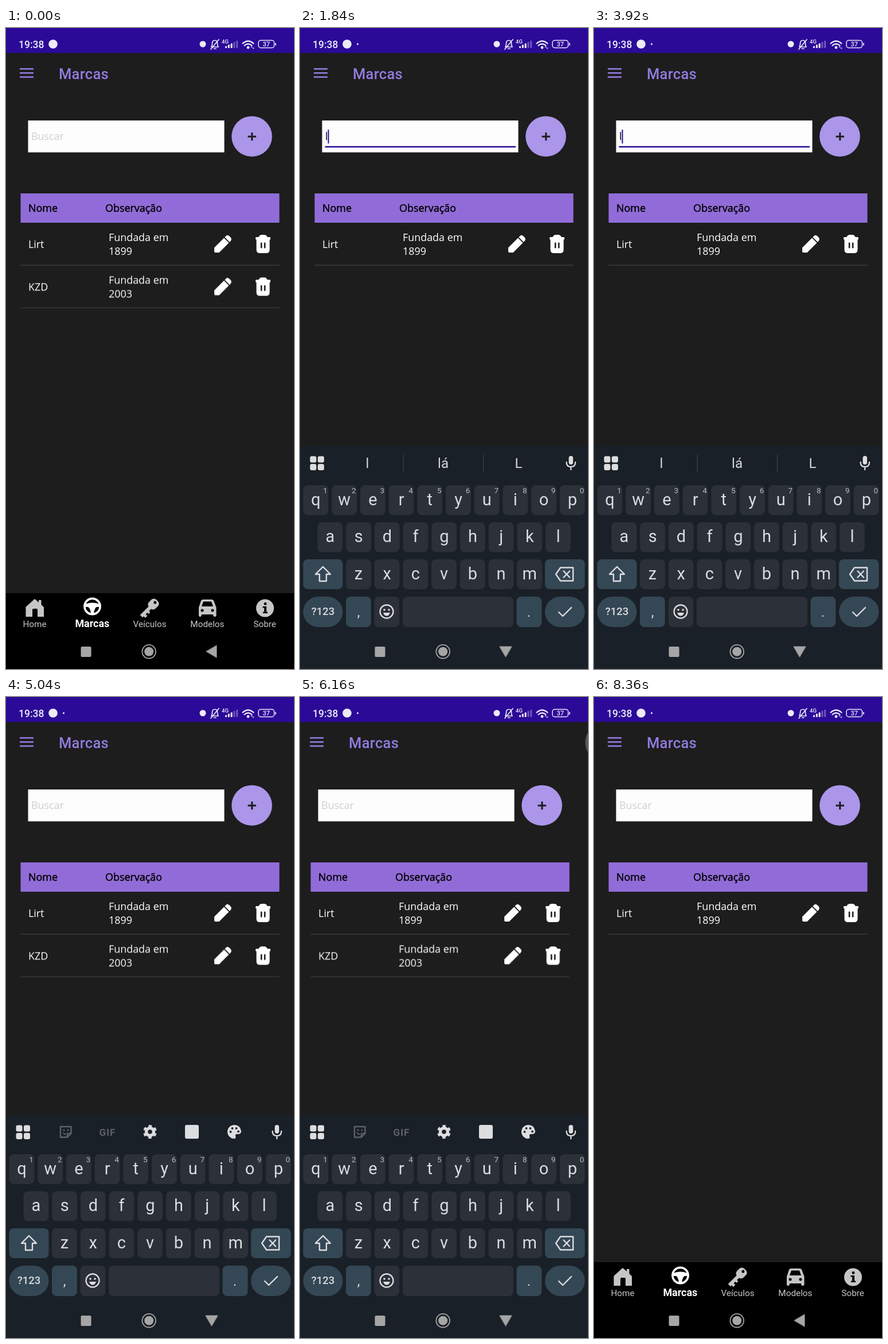
An HTML page for the animation above (8520 ms loop, 502 by 1116 pixels).

```html
<!DOCTYPE html>
<html lang="pt">
<head>
<meta charset="utf-8">
<title>Marcas</title>
<style>
html, body { margin: 0; width: 100%; height: 100%; overflow: hidden; background: #1d1d1d; }
svg { display: block; width: 502px; height: 1116px; }
text { font-family: Roboto, sans-serif; white-space: pre; }
.os { font-family: "Open Sans", sans-serif; font-size: 17.9px; }
.mid { text-anchor: middle; }
.key { font-size: 29px; fill: #d9dce0; text-anchor: middle; }
.line { fill: none; stroke-linecap: round; stroke-linejoin: round; }
#dialog { transform-origin: 251px 550px; }
</style>
</head>
<body>
<svg id="stage" viewBox="0 0 502 1116"></svg>
<script>
const LOOP = 8520;
const BG = '#1d1d1d', LILAC = '#917bdf', INDIGO = '#2b0a98', KEYS = '#1a2027';
const LIGHT = '#dddde0', GREY = '#c6c6c6', DIM = '#5c6167';

const rect = (x, y, w, h, fill, r = 0, more = '') =>
  `<rect x="${x}" y="${y}" width="${w}" height="${h}" rx="${r}" fill="${fill}" ${more}/>`;
const circle = (x, y, r, fill, more = '') => `<circle cx="${x}" cy="${y}" r="${r}" fill="${fill}" ${more}/>`;
const text = (x, y, s, more = '') => `<text x="${x}" y="${y}" ${more}>${s}</text>`;
const path = (d, fill, more = '') => `<path d="${d}" fill="${fill}" ${more}/>`;
const line = (d, color, w, more = '') => `<path class="line" d="${d}" stroke="${color}" stroke-width="${w}" ${more}/>`;
const group = (id, body, more = '') => `<g id="${id}" ${more}>${body}</g>`;

/* app pages */
const pencil = path('M363 382.5L380 365.5 388.5 374 371.5 391H365Q363 391 363 389Z' +
  'M381.300 364.2L383.5 362Q386.500 359.500 389.5 362.500L391.5 364.5Q394 367.5 391.8 370.6L389.800 372.7Z', '#fff');
const trash = path('M435 365.5Q435 364 436.5 364H440.5Q442 360 446 360H450Q454 360 455.5 364H459.5Q461 364 461 365.5V367Q461 368.5 459.5 368.5V386Q459.5 392 453.5 392H442.5Q436.5 392 436.5 386V368.5Q435 368.5 435 367Z', '#fff') +
  rect(443.8, 373.5, 2.6, 10, BG, 1) + rect(449.8, 373.5, 2.6, 10, BG, 1);

function row(i, name, year) {
  const t = (x, y, s) => text(x, y, s, 'class="os" fill="#fff"');
  return group('row' + i,
    (i ? rect(432, 361, 32, 32, '#353535', 2, 'id="press"') : '') +
    t(39, 382.5, name) + t(179, 370.5, 'Fundada em') + t(179, 394.5, year) +
    pencil + trash + rect(25.5, 412.5, 451, 1, '#4b4b4b'),
    `transform="translate(0 ${i * 74.3})"`);
}

function page(x, title, body, focus = '') {
  const head = 'class="os" fill="#000" stroke="#000" stroke-width=".45"';
  return `<g transform="translate(${x})">` + focus +
    [71.2, 78.3, 85.4].map(y => rect(24, y - 1.3, 24, 2.6, LILAC)).join('') +
    text(92, 89, title, `font-size="25.5" font-weight="500" letter-spacing=".3" fill="${LILAC}"`) +
    rect(38.5, 161, 342, 55.5, '#fdfdfd') +
    circle(428.5, 188.7, 35.3, '#ab96ea') +
    line('M421.5 189H436M428.8 182V196', BG, 3, 'style="stroke-linecap:butt"') +
    rect(25.5, 288, 451, 51, '#916cd8') +
    text(39, 320, 'Nome', head) + text(173, 320, 'Observação', head) + body + '</g>';
}
const hint = id => text(44, 195, 'Buscar', `${id} class="os" fill="#cfcfcf"`);

const typed = ['', 'l', 'li', 'lir'];
const field = hint('id="word0"') +
  typed.slice(1).map((s, i) => text(44, 195, s, `id="word${i + 1}" class="os" fill="#000"`)).join('') +
  rect(43.5, 205.6, 332.500, 2.5, INDIGO, 0, 'id="underline"') + rect(44, 177, 2, 24, INDIGO, 0, 'id="cursor"');

const pages = group('pages',
  page(0, 'Marcas', field + row(0, 'Lirt', '1899') + row(1, 'KZD', '2003')) +
  page(502, 'Veículos', hint(''), circle(36, 79, 34, '#585858')));

/* bottom tabs */
const tabIcons =
  path('M34.5 1008L50 994 57 1000V996H61.5V1004L66 1008.5V1025H55V1013Q55 1011 53 1011H48Q46 1011 46 1013V1025H34.5Z', GREY) +
  circle(150.5, 1007, 13.6, 'none', 'stroke="#fff" stroke-width="3.6"') +
  path('M138 1003Q150.5 998 163 1003V1008H158Q154 1010 153 1020H148Q147 1010 143 1008H138Z', '#fff') +
  `<g transform="rotate(45 257 1003)">${rect(249, 994, 16, 18, GREY, 6)}${rect(254, 1008, 6, 25, GREY)}` +
  `${rect(259, 1017, 4, 4, GREY)}${rect(259, 1025, 5, 5, GREY)}${circle(257, 999, 2.5, '#000')}</g>` +
  path('M336 1009L340 997Q341 995 344 995H358Q361 995 362 997L366.5 1009V1023Q366.5 1025 364 1025 361 1025 361 1021H341Q341 1025 338 1025 336 1025 336 1023Z', GREY) +
  path('M341 1007L344 998.5H358L361 1007Z', '#000') + circle(342, 1014, 2.5, '#000') + circle(360, 1014, 2.5, '#000') +
  circle(451.5, 1010, 15.5, GREY) + circle(452, 1002.5, 2.4, '#000') + path('M447.5 1007H454V1016.5H456V1019H448V1016.5H450V1009.5H447.5Z', '#000');
const tabs = rect(0, 984, 502, 132, '#000') + tabIcons +
  ['Home', 'Marcas', 'Veículos', 'Modelos', 'Sobre'].map((s, i) => text(50 + i * 100.3, 1042.5, s,
    'class="mid" ' + (i === 1 ? 'font-size="17.9" font-weight="700" fill="#fff"' : `font-size="15.3" fill="${GREY}"`))).join('');

/* keyboard */
const PITCH = 49.7, PLAIN = '#2c3038', SPECIAL = '#344754';
const rows = [['qwertyuiop', 5.5, 796], ['asdfghjkl', 30.5, 860.5], ['zxcvbnm', 80, 925]];
const keyAt = c => {
  const [s, x, y] = rows.find(r => r[0].includes(c));
  return [x + s.indexOf(c) * PITCH, y];
};
const letters = rows.map(([s, , y], n) => [...s].map((c, i) => {
  const [x] = keyAt(c);
  return rect(x, y, 43.8, 52, PLAIN, 8) + text(x + 22, y + 34.5, c, 'class="key"') +
    (n ? '' : text(x + 38.5, y + 14, (i + 1) % 10, 'class="mid" font-size="13.5" fill="#b9bdc2"'));
}).join('')).join('');

const specials =
  rect(5.5, 925, 69, 52, SPECIAL, 8) + line('M40 938L53 951H46V963H34V951H27Z', LIGHT, 2.4) +
  rect(427, 925, 69.5, 52, SPECIAL, 8) +
  line('M446 951L454 939.5H476V962.5H454ZM459.5 945.5L470 956.5M470 945.5L459.5 956.5', LIGHT, 2.4) +
  rect(5.5, 990, 69, 53, SPECIAL, 26.5) + text(40, 1022, '?123', 'class="mid" font-size="18.5" font-weight="500" fill="#d9dce0"') +
  rect(80, 990, 43.8, 53, SPECIAL, 8) + text(102, 1025, ',', 'class="key" style="font-size:24px"') +
  rect(129.5, 990, 43.8, 53, PLAIN, 8) + circle(151, 1016, 11.5, 'none', `stroke="${LIGHT}" stroke-width="2.3"`) +
  circle(147, 1013, 1.8, LIGHT) + circle(155, 1013, 1.8, LIGHT) + path('M145 1018H157Q155 1023.5 151 1023.5 147 1023.5 145 1018Z', LIGHT) +
  rect(179, 990, 193, 53, PLAIN, 8) +
  rect(377.5, 990, 43.8, 53, SPECIAL, 8) + text(399, 1025, '.', 'class="key" style="font-size:24px"') +
  rect(427, 990, 69.5, 53, SPECIAL, 26.5) + line('M451 1017L458 1024 473 1009', LIGHT, 2.4);

const grid = [17.5, 31].map(x => [745.5, 759].map(y => rect(x, y, 11, 11, LIGHT, 3)).join('')).join('');
const mic = rect(468.5, 745, 7.5, 15, LIGHT, 3.7) + line('M464.5 756Q464.5 764 472.2 764 480 764 480 756M472.2 764V769', LIGHT, 2.3);
const tools = group('tools',
  line('M95 748H113.5V760L107 766.5H95ZM107 766V760H113', DIM, 2.4) +
  circle(101, 754, 1.6, DIM) + circle(108, 754, 1.6, DIM) + line('M100 759Q102 762 104 761', DIM, 1.8) +
  text(177, 763.5, 'GIF', `class="mid" font-size="17" font-weight="700" letter-spacing="1" fill="${DIM}"`) +
  circle(251, 757, 6.5, 'none', `stroke="${LIGHT}" stroke-width="5.5"`) +
  circle(251, 757, 10, 'none', `stroke="${LIGHT}" stroke-width="4" stroke-dasharray="5.236" transform="rotate(15 251 757)"`) +
  rect(312, 745, 24, 24, LIGHT, 3) +
  path('M398 745A12 12 0 1 0 398 769Q401.5 768 400 764.5 399 761 403 761H406Q410 760 410 756 408 745 398 745Z', LIGHT) +
  [[391.5, 757], [394.5, 751], [401.5, 751], [405, 756.5]].map(([x, y]) => circle(x, y, 1.9, KEYS)).join(''));
const hints = ['lá', 'lia', 'lira'].map((mid, i) => {
  const s = typed[i + 1];
  return group('hints' + (i + 1), [[117.5, s], [249.5, mid], [381, s.toUpperCase()]].map(([x, w]) =>
    text(x, 766, w, 'class="mid" font-size="24" fill="#d5d9dd"')).join('') +
    line('M180 743V773M319.5 743V773', '#3b4249', 1.2));
}).join('');

const flash = (id, x, y, w = 43.8) => rect(x, y, w, 52, '#fff', 8, `id="${id}"`);
const keyboard = group('keyboard', rect(0, 728, 502, 388, KEYS) + grid + tools + hints + mic + letters + specials +
  typed[3].split('').map(c => flash('key-' + c, ...keyAt(c))).join('') + flash('erase', 427, 925, 69.5));

/* dialog */
const dialogText = (x, y, s, size, fill, gap, more = '') =>
  text(x, y, s, `font-size="${size}" fill="${fill}" letter-spacing="${gap}" ${more}`);
const dialog = group('dialog',
  rect(33.5, 455, 435, 189, '#424240', 1, 'style="filter:drop-shadow(0 6px 10px #0008)"') +
  dialogText(64, 499.5, 'Excluir', 20, '#ececec', .3) +
  dialogText(64, 535, 'Tem certeza que deseja excluir a marca', 18, '#b4b4b3', .5) +
  dialogText(64, 556.5, '"KZD"?', 18, '#b4b4b3', .5) +
  rect(388, 590, 60, 42, '#fff', 4, 'id="yes"') +
  dialogText(273, 617, 'Cancelar', 18, '#fff', 1.25, 'font-weight="500"') +
  dialogText(400, 617, 'Sim', 18, '#fff', 1.25, 'font-weight="500"'));

/* system bars */
const W = '#ecebf6';
const status =
  text(22, 35, '19:38', `font-size="17.5" font-weight="500" fill="${W}"`) + circle(82, 28, 7.8, W) +
  circle(100.5, 28, 1.6, W, 'id="dot"') + circle(343, 28, 5.5, W) +
  line('M358 33H370Q368.5 31 368.5 27 368.5 21.5 364 21.5 359.5 21.5 359.5 27 359.5 31 358 33M362.5 36H366M371 20L357 37', W, 1.7) +
  text(376, 27, '4G', `font-size="9.5" font-weight="500" fill="${W}"`) +
  [0, 1, 2, 3, 4].map(i => rect(382 + i * 4.8, 31.5 - i * 2.4, 3, 3.5 + i * 2.4, W, 1, i > 2 ? 'opacity=".35"' : '')).join('') +
  line('M412.5 27Q422 18.5 431.5 27M415.5 30.5Q422 25 428.5 30.5', W, 2.2) + circle(422, 34, 2.4, W) +
  path('M426 33.5L428 31.5 430 33.5ZM429 34.5H433L431 36.5Z', W) +
  rect(440, 21.5, 27.5, 13, 'none', 4, `stroke="${W}" stroke-width="1.5"`) + rect(469, 26, 1.8, 4.5, W, .8) +
  text(453.7, 32, '37', `class="mid" font-size="11" font-weight="500" fill="${W}"`);
const nav = rect(130.5, 1077, 18, 18, '#a6a6a6', 2) +
  circle(249.2, 1085.7, 11.8, 'none', 'stroke="#a6a6a6" stroke-width="1.8"') + circle(249.2, 1085.7, 8, '#a6a6a6') +
  `<g transform="translate(358.5 1085.5)">${path('M-9.5 0L8.5 -10.5V10.5Z', '#a6a6a6', 'id="back" stroke="#a6a6a6" stroke-linejoin="round"')}</g>`;

document.getElementById('stage').innerHTML =
  rect(0, 0, 502, 1116, BG) + pages + tabs + rect(0, 1056, 502, 60, KEYS, 0, 'id="navBg"') + keyboard +
  rect(0, 0, 502, 43.5, INDIGO) + rect(0, 0, 502, 1116, '#000', 0, 'id="scrim"') + dialog + status + nav;

/* motion: [ms, value, easing to the next step] */
const OUT = 'cubic-bezier(.215,.61,.355,1)', SOFT = 'ease-in-out';
function play(id, prop, steps, ease = 'linear') {
  const frames = steps.map(([ms, v, easing = ease]) => ({ offset: ms / LOOP, [prop]: v, easing }));
  frames.push({ offset: 1, [prop]: steps[steps.length - 1][1] });
  document.getElementById(id).animate(frames, { duration: LOOP, iterations: Infinity });
}
const fade = (id, ...steps) => play(id, 'opacity', steps);
const hard = (id, ...steps) => play(id, 'opacity', steps, 'step-end');
const slide = (axis, steps) => steps.map(([ms, v, e]) => [ms, `translate${axis}(${v}px)`, e]);

const entry = [[0, 0], [1520, 1], [2040, 2], [2340, 3], [3360, 2], [3680, 1], [4080, 0]];
typed.forEach((_, n) => {
  const shown = entry.map(([ms, v]) => [ms, +(v === n)]);
  hard('word' + n, ...shown);
  hard(n ? 'hints' + n : 'tools', ...shown);
});
play('cursor', 'transform', slide('X', entry.map(([ms, n]) => [ms, [0, 4.5, 9, 16.3][n]])), 'step-end');
hard('cursor', [0, 0], [1320, 1], [2840, 0], [3340, 1], [4580, 0]);
const tap = (id, ...times) => hard(id, [0, 0], ...times.flatMap(t => [[t, .14], [t + 100, 0]]));
tap('key-l', 1520);
tap('key-i', 2040);
tap('key-r', 2320);
tap('erase', 3340, 3660, 4060);
tap('yes', 7360);

hard('dot', [0, 0], [400, 1]);
fade('underline', [0, 0], [640, 0], [800, 1], [4920, 1], [5040, 0]);
hard('navBg', [0, 0], [920, 1], [7800, 0]);
play('back', 'transform', [[0, 'rotate(0deg)'], [900, 'rotate(0deg)', SOFT], [1040, 'rotate(-90deg)'],
  [7640, 'rotate(-90deg)', SOFT], [7800, 'rotate(0deg)']]);
play('keyboard', 'transform', slide('Y', [[0, 388], [965, 388, OUT], [1080, 0], [7600, 0, 'ease-in'], [7800, 388]]));
fade('row1', [0, 1], [1560, 1], [1760, 0], [4160, 0], [4320, 1], [7960, 1], [8160, 0]);
play('pages', 'transform', slide('X', [[0, 0], [5050, 0, OUT], [5320, -502], [5720, -502, OUT], [6267, 0]]));
fade('press', [0, 0], [6520, 0], [6640, 1], [7480, 1], [7640, 0]);
fade('scrim', [0, 0], [6720, 0], [6960, .33], [7480, .33], [7640, 0]);
fade('dialog', [0, 0], [6760, 0], [6920, 1], [7480, 1], [7620, 0]);
play('dialog', 'transform', [[0, 'scale(.92)'], [6760, 'scale(.92)', OUT], [6980, 'scale(1)']]);
</script>
</body>
</html>
```
